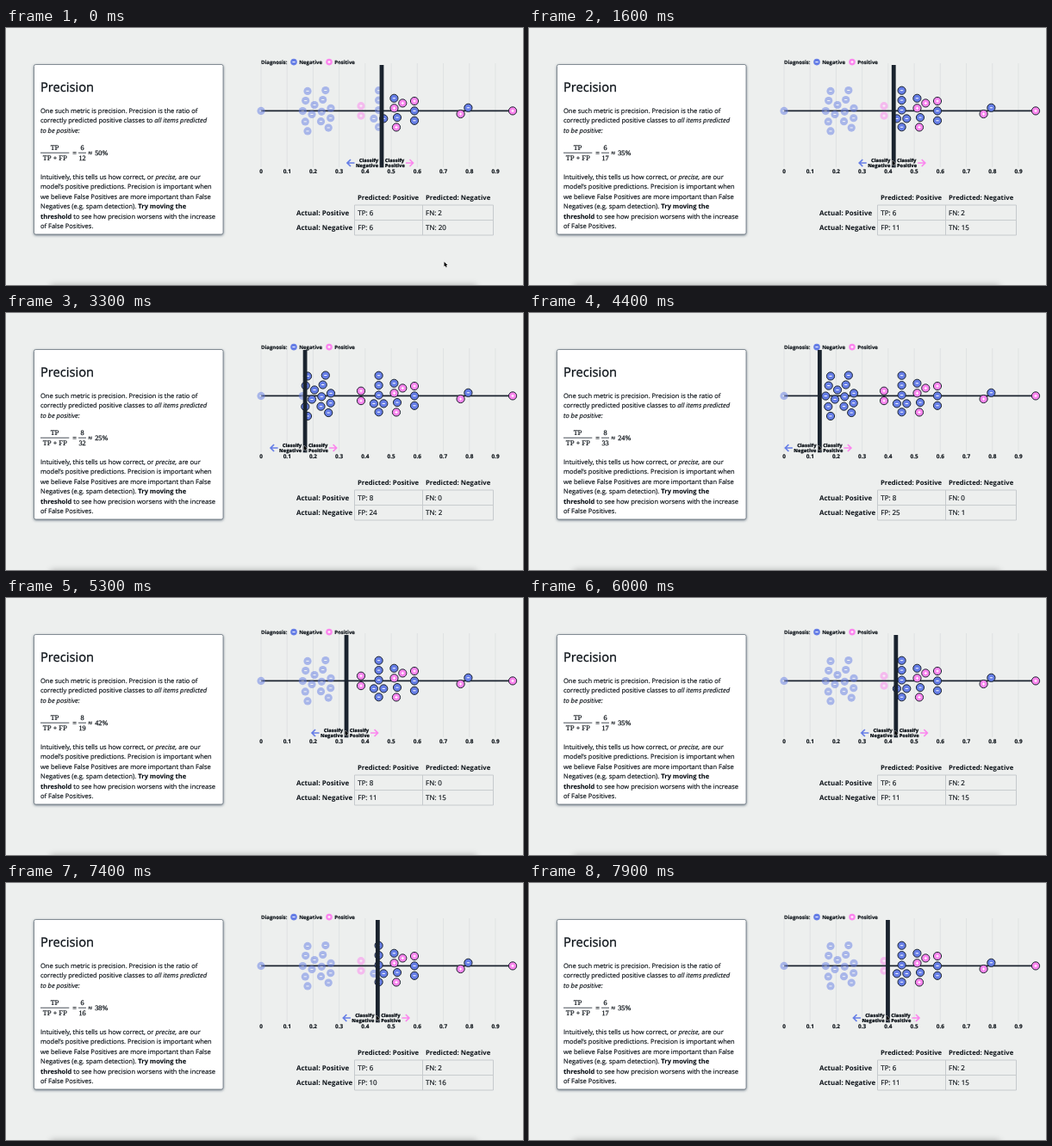
An HTML page for the animation above (8 s loop, 600 px wide and 299 px high).

```html
<!DOCTYPE html>
<html lang="en">
<head>
<meta charset="utf-8">
<title>Precision</title>
<style>
  html, body { margin: 0; width: 100%; height: 100%; overflow: hidden; background: #edefee; }
  svg { display: block; width: 600px; height: 299px; }
  text {
    font: 7.52px "Open Sans", sans-serif; fill: #0c1218; stroke: #0c1218; stroke-width: .17;
    white-space: pre; text-rendering: geometricPrecision;
  }
  .title { font-size: 14.7px; stroke-width: .3; }
  .b { font-weight: 700; stroke-width: .1; }
  .i { font-style: italic; }
  .column { font-weight: 700; font-size: 7.7px; stroke-width: 0; }
  .row { font-weight: 700; font-size: 7.95px; stroke-width: 0; }
  .cell { font-size: 8px; }
  .legend { font-weight: 700; font-size: 6px; }
  .tick { font-weight: 700; font-size: 6.4px; }
  .side { font-weight: 800; font-size: 5.6px; }
  .math { font: 8.2px "Liberation Serif", serif; stroke-width: .25; }
  .var { font: 8px "Noto Serif", serif; }
  .mid { text-anchor: middle; }
  .end { text-anchor: end; }
  .card { fill: #fff; stroke: #6b757f; stroke-width: .8; filter: drop-shadow(.5px 1px 1.8px #24384d99); }
  .below { fill: #0004; filter: blur(3.5px); }
  .sign { stroke: #fff; stroke-width: 1; }
</style>
</head>
<body>
<svg id="stage" viewBox="0 0 600 299"></svg>
<script>
const LOOP = 8000, BLUE = '#667ee6', PINK = '#fb86ee', DARK = '#1a232e', AXIS_Y = 96.4, LEADING = 11.5;
const stage = document.getElementById('stage');

function add(tag, attrs, parent = stage) {
  const el = document.createElementNS('http://www.w3.org/2000/svg', tag);
  for (const key in attrs) el.setAttribute(key, attrs[key]);
  parent.append(el);
  return el;
}
function text(x, y, cls, content, parent) {
  const el = add('text', { x, y, class: cls }, parent);
  el.innerHTML = content;
  return el;
}
const lines = (x, y, cls, leading, rows, parent) =>
  rows.forEach((s, i) => text(x, y + i * leading, cls, s, parent));
const line = (d, stroke, width, parent) =>
  add('path', { d, stroke, 'stroke-width': width, fill: 'none' }, parent);

function marker(x, y, positive, r) {
  const g = add('g', { transform: `translate(${x} ${y})` });
  const disc = add('circle', { r, fill: positive ? PINK : BLUE }, g);
  add('path', { d: 'M-1.6 0h3.2' + (positive ? 'M0-1.6v3.2' : ''), class: 'sign' }, g);
  return { x, positive, g, disc };
}

// Card
add('rect', { x: 32.5, y: 42.5, width: 219.5, height: 197.5, rx: 2, class: 'card' });
text(40, 73.6, 'title', 'Precision');
lines(40, 98.7, '', LEADING, [
  'One such metric is precision. Precision is the ratio of',
  'correctly predicted positive classes to <tspan class="i">all items predicted</tspan>',
  '<tspan class="i">to be positive:</tspan>'
]);
lines(40, 175.8, '', LEADING, [
  'Intuitively, this tells us how correct, or <tspan class="i">precise,</tspan> are our',
  'model’s positive predictions. Precision is important when',
  'we believe False Positives are more important than False',
  'Negatives (e.g. spam detection). <tspan class="b">Try moving the</tspan>',
  '<tspan class="b">threshold</tspan> to see how precision worsens with the increase',
  'of False Positives.'
]);

// Formula
const [TOP, MIDDLE, BOTTOM] = [141.8, 147.8, 153.8];
text(56.6, TOP, 'var mid', 'TP');
text(56.8, BOTTOM, 'var mid', 'TP + FP');
line('M40 145.2H73.3M84 145.2H93', DARK, .8);
text(79.5, MIDDLE, 'math mid', '=');
text(97.7, MIDDLE, 'math mid', '≈');
const numerator = text(88.5, TOP, 'math mid', '');
const denominator = text(88.5, BOTTOM, 'math mid', '');
const percent = text(103.2, MIDDLE, 'math', '');

// Legend
text(296, 41.8, 'legend', 'Diagnosis:');
['Negative', 'Positive'].forEach((name, i) => {
  const x = 334 + i * 41;
  marker(x, 39.6, i === 1, 3.8);
  text(x + 6.2, 41.8, 'legend', name);
});

// Axis
for (let i = 0; i < 10; i++) {
  const x = 296 + i * 30.22;
  line(`M${x} 41V162`, '#dcdfe0', .8);
  text(x, 169, 'tick mid', i ? '0.' + i : '0');
}
line(`M296 ${AXIS_Y}H588`, DARK, 1.8);

// Each cluster lists x positions with their class
const clusters = [
  '296-',
  '366.3- 358- 355- 344.3- 347.3- 347.7- 350- 350- 365.5- 367.7- 377- 376.7- 374.2- 370.8-',
  '412+ 412+',
  '432.6- 432.6- 426.9- 438.3- 432.6- 432.6-',
  '450.5+ 460.3+ 454- 450.4- 453+',
  '474- 474+ 474-',
  '527.6+ 536.4-',
  '588+'
];
// Beeswarm: take the free spot nearest the axis, then centre the cluster on it
function swarm(xs, gap = 11.4) {
  const placed = [];
  for (const x of xs) {
    const near = placed.filter(p => Math.abs(p.x - x) < gap)
      .map(p => ({ y: p.y, clear: Math.sqrt(gap ** 2 - (p.x - x) ** 2) }));
    const y = [0, ...near.flatMap(n => [n.y - n.clear, n.y + n.clear])]
      .filter(y => near.every(n => Math.abs(y - n.y) > n.clear - 1e-6))
      .sort((a, b) => Math.abs(a) - Math.abs(b) || a - b)[0];
    placed.push({ x, y });
  }
  const mean = placed.reduce((sum, p) => sum + p.y, 0) / placed.length;
  return placed.map(p => p.y - mean);
}
const points = clusters.flatMap(cluster => {
  const items = cluster.split(' '), xs = items.map(parseFloat), ys = swarm(xs);
  return items.map((item, i) => marker(xs[i], AXIS_Y + ys[i], item.endsWith('+'), 4.6));
});

// Threshold
const threshold = add('g', {});
add('rect', { x: -2.4, y: 43, width: 4.8, height: 119.3, fill: DARK }, threshold);
lines(-3.8, 156.3, 'side end', 5.8, ['Classify', 'Negative'], threshold);
lines(3.8, 156.3, 'side', 5.8, ['Classify', 'Positive'], threshold);
line('M-31.5 157h-8.5m4-4-4 4 4 4', BLUE, 1.7, threshold);
line('M28 157h8.5m-4-4 4 4-4 4', PINK, 1.7, threshold);

// Confusion matrix
line('M404.5 206h161v35h-161zm0 17.6h161M483.5 206v35', '#c6cacd', 1);
const cells = {};
['Positive', 'Negative'].forEach((name, i) => {
  text(408 + i * 79, 200, 'column', 'Predicted: ' + name);
  text(337, 217.6 + i * 17.6, 'row', 'Actual: ' + name);
  [['TP', 'FN'], ['FP', 'TN']][i].forEach((key, j) => {
    cells[key] = text(408.3 + j * 78.7, 217.5 + i * 17.6, 'cell', '');
  });
});

// Shadow of the section below
add('rect', { x: 52, y: 299, width: 494, height: 12, class: 'below' });

const cursor = add('path', {
  d: 'M0 0V5.6L1.3 4.4 2.2 6.4 3.2 6 2.3 4H4Z', fill: '#000', stroke: '#fff', 'stroke-width': .7, 'paint-order': 'stroke'
});

// Threshold drag: [ms, x]
const drag = [[0, 436], [950, 436], [2400, 391.5], [3300, 347.1], [4350, 337], [5300, 395], [6750, 443], [LOOP, 414]];
const slope = i => (drag[i + 1][1] - drag[i][1]) / (drag[i + 1][0] - drag[i][0]);
// Harmonic-mean tangents keep the curve from overshooting
function tangent(i) {
  if (i === 0) return slope(0);
  if (i === drag.length - 1) return slope(i - 1);
  const a = slope(i - 1), b = slope(i);
  return a * b > 0 ? 2 * a * b / (a + b) : 0;
}
function thresholdAt(t) {
  const i = drag.findLastIndex(([time]) => time <= t);
  const [t0, x0] = drag[i], [t1, x1] = drag[i + 1], d = t1 - t0, u = (t - t0) / d, v = 1 - u;
  return x0 * v * v * (1 + 2 * u) + x1 * u * u * (3 - 2 * u)
    + d * u * v * (v * tangent(i) - u * tangent(i + 1));
}

function draw(t) {
  const x = thresholdAt(t);
  const count = { TP: 0, FN: 0, FP: 0, TN: 0 };
  threshold.setAttribute('transform', `translate(${x} 0)`);
  for (const p of points) {
    const active = p.x >= x;
    count[active ? (p.positive ? 'TP' : 'FP') : (p.positive ? 'FN' : 'TN')]++;
    p.g.setAttribute('opacity', active ? 1 : .5);
    p.disc.setAttribute('stroke', active ? DARK : 'none');
  }
  for (const key in cells) cells[key].textContent = `${key}: ${count[key]}`;
  const total = count.TP + count.FP;
  numerator.textContent = count.TP;
  denominator.textContent = total;
  percent.textContent = Math.round(100 * count.TP / total) + '%';

  const u = Math.min(t / 900, 1), reach = u * u * (3 - 2 * u);
  const cx = 508.5 + (x - 510) * reach, cy = 272 - 118 * reach;
  cursor.setAttribute('transform', `translate(${cx} ${cy})`);
}

const start = performance.now();
function tick() {
  draw((performance.now() - start) % LOOP);
  requestAnimationFrame(tick);
}
tick();
</script>
</body>
</html>
```
